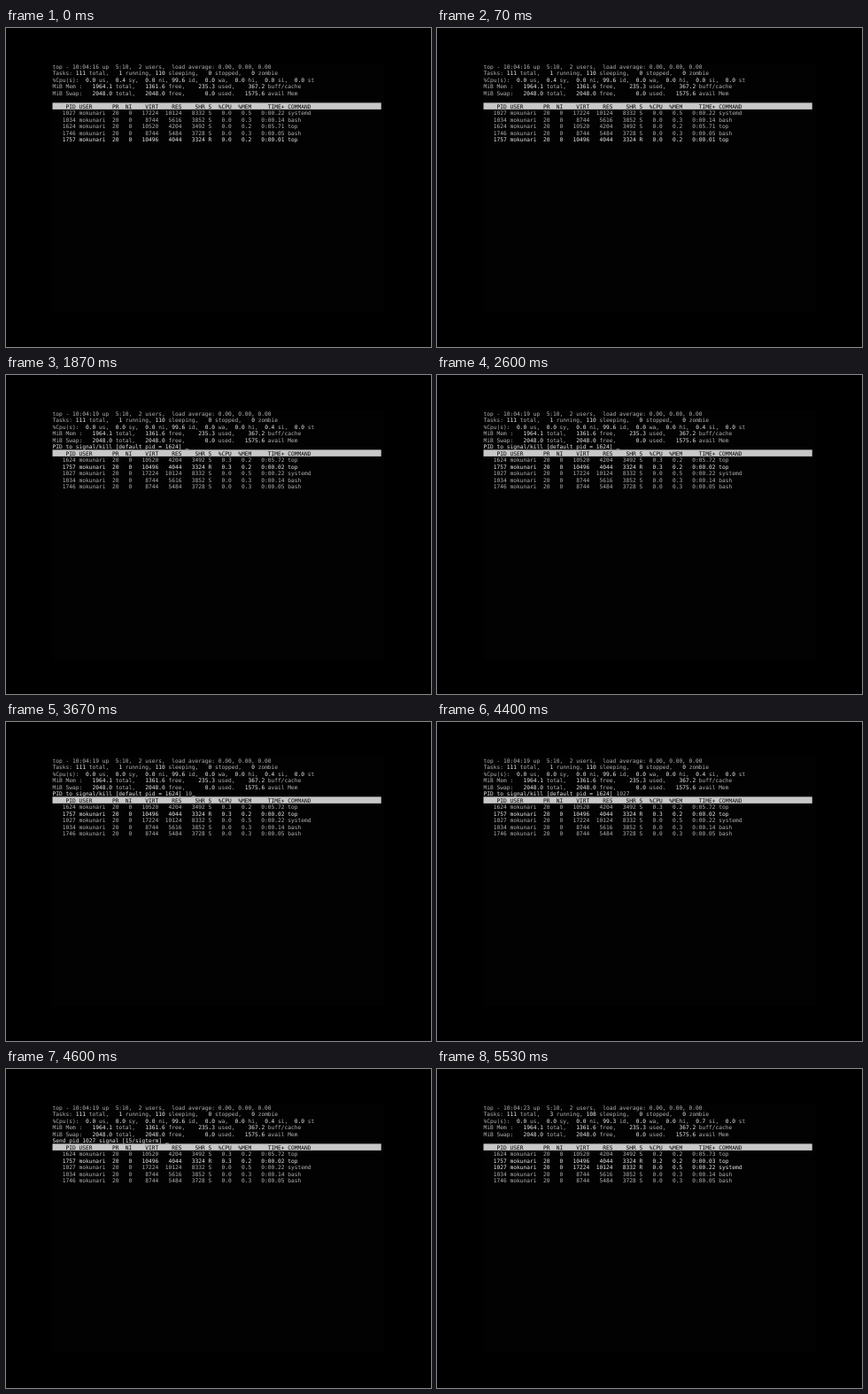
These frames come from a looping animation (480 by 360 pixels, 8000 ms). An HTML page:

```html
<!DOCTYPE html>
<html lang="en">
<head>
<meta charset="utf-8">
<title>Process monitor</title>
<style>
  html, body { margin: 0; width: 100%; height: 100%; overflow: hidden; background: #000; }
  svg { display: block; width: 100vw; height: 100vh; }
  text {
    font: 13.288px "DejaVu Sans Mono", "Noto Sans Mono", monospace;
    fill: #b4b4b4;
    white-space: pre;
    text-rendering: geometricPrecision;
  }
  .hi { fill: #ececec; }
  .back { fill: #020202; }
  .bar { fill: #c8c8c8; }
  .head { fill: #000; }

  .step { opacity: 0; animation: 8s step-end infinite; }
  #start { animation-name: start; }
  #mid { animation-name: mid; }
  #end { animation-name: end; }
  #ask { animation-name: ask; }
  #send { animation-name: send; }
  #d0 { animation-name: d0; }
  #d1 { animation-name: d1; }
  #d2 { animation-name: d2; }
  #d3 { animation-name: d3; }
  #cursor { fill: #b4b4b4; animation-name: cursor; }

  @keyframes start { 0% { opacity: 1 } 14.125%, 100% { opacity: 0 } }
  @keyframes mid { 0% { opacity: 0 } 14.125% { opacity: 1 } 68.375%, 100% { opacity: 0 } }
  @keyframes end { 0% { opacity: 0 } 68.375%, 100% { opacity: 1 } }
  @keyframes ask { 0% { opacity: 0 } 23.375% { opacity: 1 } 55.875%, 100% { opacity: 0 } }
  @keyframes send { 0% { opacity: 0 } 55.875% { opacity: 1 } 68.375%, 100% { opacity: 0 } }

  /* typed digits */
  @keyframes d0 { 0% { opacity: 0 } 39.125% { opacity: 1 } 55.875%, 100% { opacity: 0 } }
  @keyframes d1 { 0% { opacity: 0 } 40.875% { opacity: 1 } 55.875%, 100% { opacity: 0 } }
  @keyframes d2 { 0% { opacity: 0 } 47.5% { opacity: 1 } 55.875%, 100% { opacity: 0 } }
  @keyframes d3 { 0% { opacity: 0 } 50.875% { opacity: 1 } 55.875%, 100% { opacity: 0 } }

  /* blinks every 200 ms and moves with the typing, 8 units per column */
  @keyframes cursor {
    0% { opacity: 0; transform: translateX(320px) }
    23.375%, 27.5%, 32.5%, 37.5% { opacity: 1 }
    25%, 30%, 35% { opacity: 0 }
    39.125% { opacity: 1; transform: translateX(328px) }
    40% { opacity: 0 }
    40.875% { opacity: 1; transform: translateX(336px) }
    42.5% { opacity: 0 }
    45.875% { opacity: 1 }
    47.5% { opacity: 1; transform: translateX(344px) }
    48.375% { opacity: 0 }
    50.875% { opacity: 1; transform: translateX(352px) }
    53.375% { opacity: 0 }
    55.875% { opacity: 1; transform: translateX(272px) }
    60.875%, 65.875% { opacity: 1 }
    58.375%, 63.375%, 68.375% { opacity: 0 }
    100% { opacity: 0; transform: translateX(272px) }
  }
</style>
</head>
<body>
<svg viewBox="0 0 480 360">
  <!-- an 800 by 600 console, centred -->
  <g id="term" transform="translate(52.5 39.375) scale(.46875)"></g>
</svg>
<script>
  const CELL_W = 8, CELL_H = 16, BASELINE = 13.3, USER = "mokunari";

  // Text between asterisks is bright.
  const line = (row, str, cls = "", col = 0) =>
    `<text xml:space="preserve" class="${cls}" x="${col * CELL_W}" y="${row * CELL_H + BASELINE}">` +
    str.replace(/\*(.*?)\*/g, '<tspan class="hi">$1</tspan>') + "</text>";

  const group = (id, body) => `<g id="${id}" class="step">${body}</g>`;

  // pid: virtual, resident, shared, memory share, command
  const procs = {
    1027: [17224, 10124, 8332, "0.5", "systemd"],
    1034: [8744, 5616, 3852, "0.3", "bash"],
    1624: [10520, 4204, 3492, "0.2", "top"],
    1746: [8744, 5484, 3728, "0.3", "bash"],
    1757: [10496, 4044, 3324, "0.2", "top"]
  };

  const pad = (v, n) => String(v).padStart(n);

  function procLine(row, [pid, state, cpu, time]) {
    const [virt, res, shr, mem, cmd] = procs[pid];
    const str = pad(pid, 7) + " " + USER.padEnd(9) + " 20   0" + pad(virt, 8) + pad(res, 7) +
      pad(shr, 7) + " " + state + pad(cpu, 6) + pad(mem, 6) + pad("0:" + time, 10) + " " + cmd;
    return line(row, str, state === "R" ? "hi" : "");
  }

  function screen(id, clock, running, sleeping, [sy, idle, si], rows) {
    const cpu = [["0.0", "us"], [sy, "sy"], ["0.0", "ni"], [idle, "id"],
                 ["0.0", "wa"], ["0.0", "hi"], [si, "si"], ["0.0", "st"]];
    return group(id,
      line(0, `top - ${clock} up  5:10,  2 users,  load average: 0.00, 0.00, 0.00`) +
      line(1, `Tasks:* 111 *total,*${pad(running, 4)} *running,*${pad(sleeping, 4)} *sleeping,*   0 *stopped,*   0 *zombie`) +
      line(2, "%Cpu(s):" + cpu.map(([v, name]) => `*${pad(v, 5)} *${name}`).join(",")) +
      rows.map((r, i) => procLine(7 + i, r)).join(""));
  }

  const common =
    '<rect class="back" width="800" height="600"/>' +
    line(3, "MiB Mem :*   1964.1 *total,*   1361.6 *free,*    235.3 *used,*    367.2 *buff/cache") +
    line(4, "MiB Swap:*   2048.0 *total,*   2048.0 *free,*      0.0 *used.*   1575.6 *avail Mem") +
    `<rect class="bar" y="${6 * CELL_H}" width="${99 * CELL_W}" height="${CELL_H}"/>` +
    line(6, "    PID USER      PR  NI    VIRT    RES    SHR S  %CPU  %MEM     TIME+ COMMAND", "head");

  const prompts =
    group("ask", line(5, "PID to signal/kill [default pid = 1624]", "hi")) +
    [..."1027"].map((d, i) => group("d" + i, line(5, d, "", 40 + i))).join("") +
    group("send", line(5, "Send pid 1027 signal [15/sigterm]", "hi")) +
    `<rect id="cursor" class="step" y="${5 * CELL_H + 14}" width="${CELL_W}" height="2"/>`;

  document.getElementById("term").innerHTML = common +
    screen("start", "10:04:16", 1, 110, ["0.4", "99.6", "0.0"], [
      [1027, "S", "0.0", "00.22"],
      [1034, "S", "0.0", "00.14"],
      [1624, "S", "0.0", "05.71"],
      [1746, "S", "0.0", "00.05"],
      [1757, "R", "0.0", "00.01"]
    ]) +
    screen("mid", "10:04:19", 1, 110, ["0.0", "99.6", "0.4"], [
      [1624, "S", "0.3", "05.72"],
      [1757, "R", "0.3", "00.02"],
      [1027, "S", "0.0", "00.22"],
      [1034, "S", "0.0", "00.14"],
      [1746, "S", "0.0", "00.05"]
    ]) +
    screen("end", "10:04:23", 3, 108, ["0.0", "99.3", "0.7"], [
      [1624, "S", "0.2", "05.73"],
      [1757, "R", "0.2", "00.03"],
      [1027, "R", "0.0", "00.22"],
      [1034, "S", "0.0", "00.14"],
      [1746, "S", "0.0", "00.05"]
    ]) + prompts;
</script>
</body>
</html>
```
